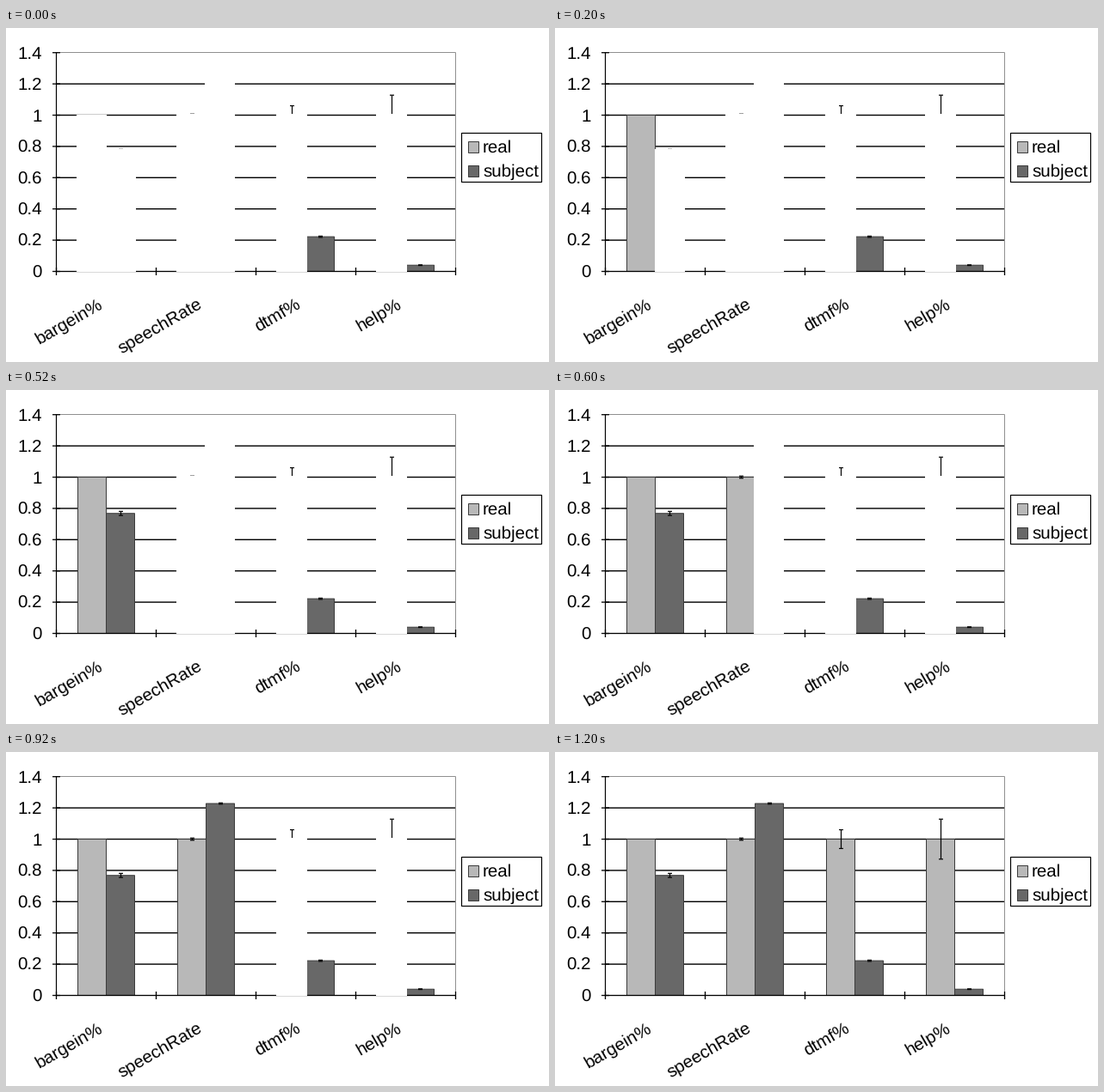
A matplotlib script that plays this animation: 631 by 389 pixels, repeating every 1.4 s.

```python
import matplotlib.pyplot as plt
from matplotlib.animation import FuncAnimation
from matplotlib.patches import Rectangle

W, H, DPI = 631, 389, 100
PX = 72 / DPI
LEFT, RIGHT, TOP, BASE = 58.5, 522.5, 28.5, 283.5
UNIT = 182
STEP = (RIGHT - LEFT) / 4
BAR = 33
LIGHT, DARK, EDGE, FRAME = "#b8b8b8", "#686868", "#3c3c3c", "#909090"

plt.rcParams.update({"font.family": "Liberation Sans", "path.snap": False,
                     "text.hinting": "none"})
fig = plt.figure(figsize=(W / DPI, H / DPI), dpi=DPI, facecolor="white")
ax = fig.add_axes([0, 0, 1, 1])
ax.set_xlim(0, W)
ax.set_ylim(H, 0)
ax.axis("off")


def y_at(value):
    return BASE - value * UNIT


def line(x0, y0, x1, y1, z, width=1.0, color="black"):
    ax.plot([x0, x1], [y0, y1], color=color, lw=width * PX, zorder=z,
            solid_capstyle="butt")


def box(x0, y0, x1, y1, z, fill, edge="none", width=1.0):
    patch = Rectangle((x0, y0), x1 - x0, y1 - y0, facecolor=fill,
                      edgecolor=edge, lw=width * PX, zorder=z)
    return ax.add_patch(patch)


def label(x, y, text, **style):
    ax.text(x, y, text, fontsize=20.5 * PX, va="baseline", zorder=8, **style)


def bar(x, value, error, fill):
    box(x, y_at(value), x + BAR, BASE, 3, fill, EDGE)
    if error:
        mid = x + 17
        high, low = y_at(value + error), y_at(value - error)
        line(mid, high, mid, low, 4, 1.2)
        for y in (high, low):
            line(mid - 2.5, y, mid + 2.5, y, 4, 1.2)


# Plot area, grid and axes
for k in range(1, 7):
    line(LEFT, y_at(0.2 * k), RIGHT, y_at(0.2 * k), 1, 1.4)
line(LEFT, TOP, RIGHT, TOP, 2, color=FRAME)
line(RIGHT, TOP, RIGHT, BASE, 2, color=FRAME)
line(LEFT, TOP, LEFT, BASE, 5, 1.2)
line(LEFT, BASE, RIGHT, BASE, 5, 1.3)
for k in range(8):
    y = y_at(0.2 * k)
    line(LEFT - 4.5, y, LEFT + 4.5, y, 5, 1.3)
    label(42, y + 7, f"{0.2 * k:.1f}".removesuffix(".0"), ha="right")
for k in range(5):
    x = LEFT + k * STEP
    line(x, BASE - 4.5, x, BASE + 4.5, 5, 1.3)

# Category, right end of its label, real error, subject value, subject error
DATA = [("bargein%", 114, 0, 0.768, 0.013),
        ("speechRate", 229.5, 0.007, 1.228, 0.004),
        ("dtmf%", 343.5, 0.06, 0.222, 0.004),
        ("help%", 460.5, 0.128, 0.04, 0.002)]
for k, (name, end, real_error, subject, subject_error) in enumerate(DATA):
    x = LEFT + 25 + k * STEP
    bar(x, 1, real_error, LIGHT)
    bar(x + BAR, subject, subject_error, DARK)
    label(end, 325, name, ha="right", rotation=30, rotation_mode="anchor")

# Legend
box(529.5, 122.5, 622.5, 179.5, 6, "white", "black", 1.2)
for y, name, fill in ((132.5, "real", LIGHT), (160.5, "subject", DARK)):
    box(537.5, y, 549.5, y + 13, 7, fill, EDGE)
    label(554, y + 12.5, name)

# White covers, removed one at a time
COVERS = [(82, 101, 117), (116, 141, 151), (198, 100, 231),
          (231, 58, 266), (314, 100, 350), (430, 100, 466)]
covers = [box(x0, y0, x1, 284, 6, "white") for x0, y0, x1 in COVERS]


def update(step):
    for k, cover in enumerate(covers):
        cover.set_visible(k >= step)
    return covers


anim = FuncAnimation(fig, update, frames=len(covers) + 1, interval=200,
                     repeat=True, repeat_delay=0, blit=False)
plt.show()
```
